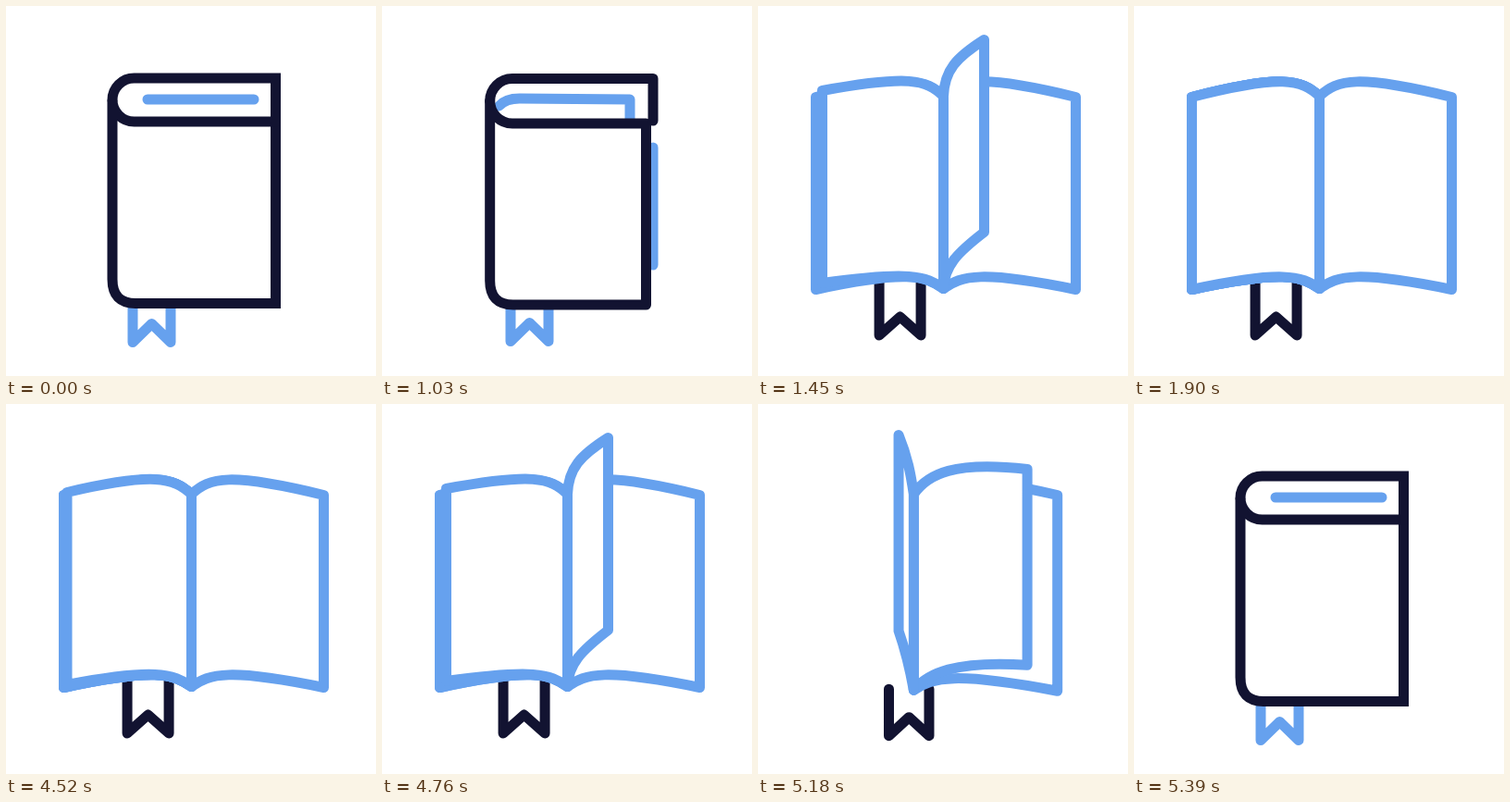
An HTML page with a canvas for the animation above (5420 ms loop, 400 by 400 pixels).

```html
<!DOCTYPE html>
<html lang="en">
<head>
<meta charset="utf-8">
<title>Book</title>
<style>
  html, body { margin: 0; width: 100%; height: 100%; overflow: hidden; background: #fff; }
  canvas { display: block; }
</style>
</head>
<body>
<canvas id="stage" width="400" height="400"></canvas>
<script>
const ctx = document.getElementById('stage').getContext('2d');
const BLUE = '#66a1ee', NAVY = '#121331';
const LOOP = 5420, STEP = 30, LAST = 30, OPEN_AT = 1030, CLOSE_AT = 4520;
const PAGE_HEIGHT = 208, LOWER_SAG = 4;

// Turning page: step, then two curve handles and the outer corner, relative to the spine.
const POSES = [
  [0, 20, -18, 40, -24, 143, 1],
  [3, 14, -22, 40, -36, 113, -27],
  [4, 8, -22, 38, -40, 79, -49],
  [5, 1, -28, 14, -42, 44, -61],
  [7, -3, -22, -6, -40, -15, -64],
  [10, -17, -20, -32, -22, -114, -25],
  [11, -19, -18, -37, -23, -131, -6],
  [13, -20, -18, -40, -24, -134.5, -2],
  [14, -20, -18, -40, -24, -138, 1],
];
const TURN_STARTS = [0, 4, 10, 16];

const lerp = (a, b, t) => a + (b - a) * t;
const clamp = (v, lo, hi) => Math.min(hi, Math.max(lo, v));
const smooth = t => t * t * (3 - 2 * t);

function poseAt(step) {
  const s = clamp(step, 0, 14);
  const i = Math.max(1, POSES.findIndex(p => p[0] >= s));
  const a = POSES[i - 1], b = POSES[i];
  return a.map((v, j) => lerp(v, b[j], (s - a[0]) / (b[0] - a[0]))).slice(1);
}

function draw(d, color, fill) {
  const path = new Path2D(d);
  if (fill) {
    ctx.fillStyle = '#fff';
    ctx.fill(path);
  }
  ctx.strokeStyle = color;
  ctx.stroke(path);
}

function drawBookmark(x, top, bottom, half, color) {
  draw(`M${x - half} ${top}V${bottom}L${x} ${bottom - 20}L${x + half} ${bottom}V${top}`, color);
}

function drawClosed(k, opened) {
  const x = lerp(115, 200.5, opened);
  const back = lerp(291.5, 343.5, opened) + (k ? 0.5 : 0);
  const cover = 291.5 - 2 * k * k - 4 * k;
  const top = 78 + k * 0.5, front = 125 + k * 2, bottom = 321.5 + k * 1.5;
  const r = (front - top) / 2, mid = top + r;

  drawBookmark(157.5 + 2 * k, 325, 363.5 - k, 20.5, BLUE);
  if (k) {
    draw(`M${back} 153V280`, BLUE);
    draw(`M${x + 10} 108Q${x + 17} 100 ${x + 32} 100L268 101V${front}`, BLUE);
  } else {
    draw('M153 101H268', BLUE);
  }
  ctx.lineJoin = k ? 'round' : 'miter';
  draw(`M${x + r} ${front}H${cover}V${bottom}H${x + 25}Q${x} ${bottom} ${x} ${bottom - 26}V${mid}A${r} ${r} 0 0 0 ${x + r} ${front}Z`, NAVY, true);
  draw(`M${x} ${mid}A${r} ${r} 0 0 1 ${x + r} ${top}H${back}V${front - (k ? 3 : 0)}`, NAVY);
  ctx.lineJoin = 'round';
}

function drawOpen(k, opened) {
  const turned = k >= 6;
  const color = turned ? BLUE : NAVY;
  const x = lerp(115, 200.5, opened), y = 97.5;
  const stretch = lerp(1.23, 1, opened);
  const height = lerp(218, PAGE_HEIGHT, opened), lower = height + LOWER_SAG;

  const drawPage = pose => {
    const [ax, ay, bx, by, cx, cy] = pose.map((v, i) => i % 2 ? y + v : x + v * stretch);
    draw(`M${x} ${y}C${ax} ${ay} ${bx} ${by} ${cx} ${cy}V${cy + height}` +
      `C${bx} ${by + lower} ${ax} ${ay + lower} ${x} ${y + height}Z`, color, true);
  };

  // The bookmark swings across the spine with the cover.
  const coverX = poseAt(k)[4];
  drawBookmark(x + coverX * 0.34, lerp(325, 298, opened),
    lerp(363, 356, opened), lerp(20.5, 22.5, opened), turned ? NAVY : BLUE);
  drawPage(poseAt(0));
  const pages = TURN_STARTS.filter(start => k > start).map(start => poseAt(k - start));
  pages.filter(p => p[4] >= 0).reverse().forEach(drawPage);
  pages.filter(p => p[4] < 0).forEach(drawPage);
}

function stepAt(t) {
  if (t < CLOSE_AT) return clamp(Math.floor((t - OPEN_AT) / STEP) + 1, 0, LAST);
  return clamp(LAST - 1 - Math.floor((t - CLOSE_AT) / STEP), 0, LAST);
}

function render() {
  const k = stepAt(performance.now() % LOOP);
  const opened = smooth(clamp(k / 12, 0, 1));
  ctx.fillStyle = '#fff';
  ctx.fillRect(0, 0, 400, 400);
  ctx.lineWidth = 11;
  ctx.lineCap = ctx.lineJoin = 'round';
  (k < 4 ? drawClosed : drawOpen)(k, opened);
  requestAnimationFrame(render);
}
render();
</script>
</body>
</html>
```
